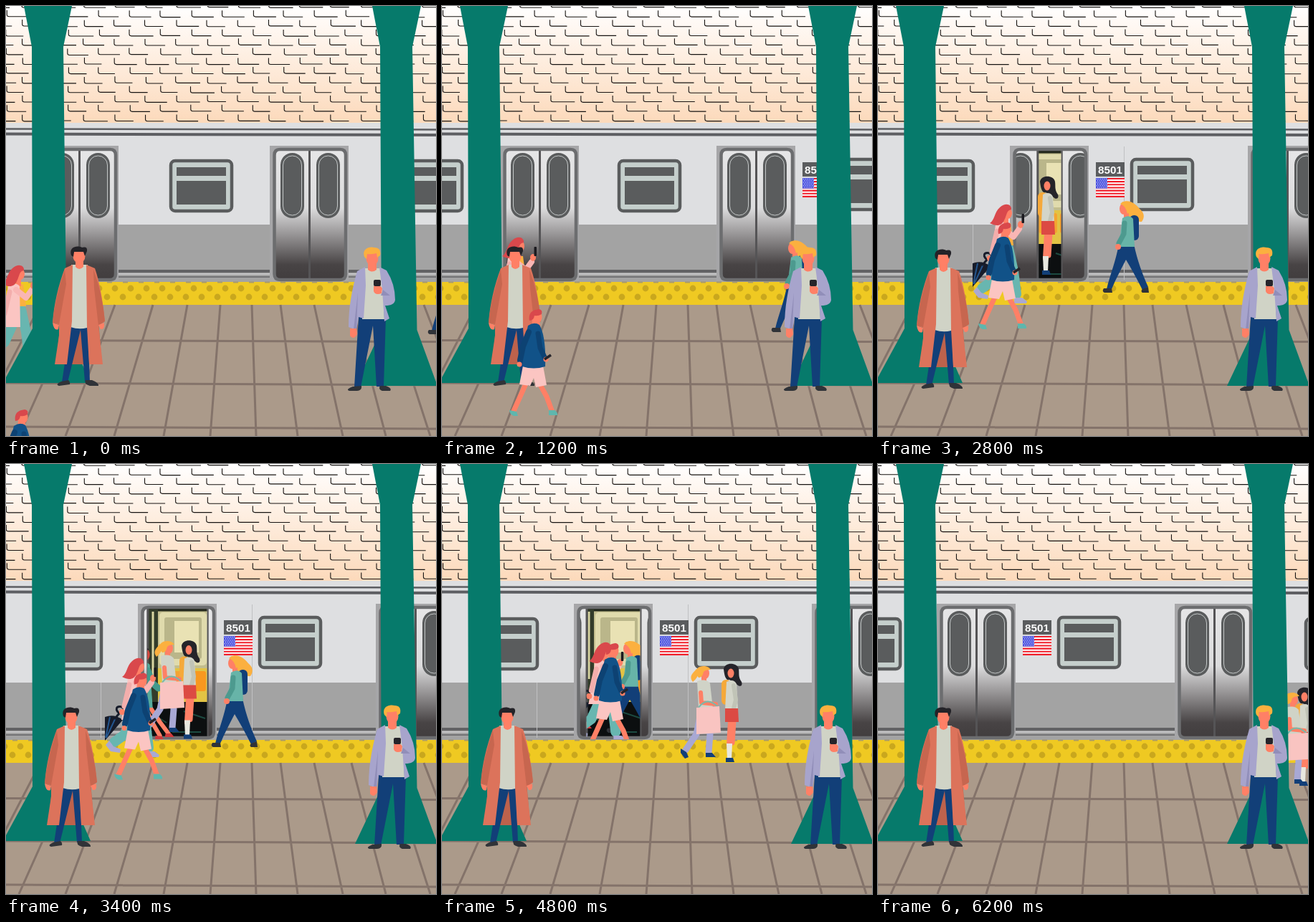
Recreate the animation shown at these times as an HTML page. Size 600x600 px, loop 6.4 s.

```html
<!DOCTYPE html>
<html lang="en">
<head>
<meta charset="utf-8">
<title>Subway platform</title>
<style>
html, body { margin: 0; width: 100%; height: 100%; overflow: hidden; background: #fff; }
svg { display: block; width: 100vw; height: 100vh; }
.skin { fill: #ff8066; }
.skinLine { stroke: #ff8066; }
.limb { fill: none; stroke-linecap: round; stroke-linejoin: round; }
.navy { fill: #123f78; }
.shoe { fill: #303338; }
.glass { fill: #5a5c5d; }
.pillar { fill: #067a6b; }
.num { font: bold 15.2px "Liberation Sans", Arial, sans-serif; fill: #fff; }
</style>
</head>
<body>
<svg viewBox="0 0 600 600">
<defs>
  <linearGradient id="wall" x2="0" y2="1"><stop stop-color="#fff"/><stop offset=".12" stop-color="#fffaf6"/><stop offset="1" stop-color="#fcd9ba"/></linearGradient>
  <linearGradient id="steel" x2="0" y2="1"><stop stop-color="#e6e6e7"/><stop offset=".45" stop-color="#dcdcdd"/><stop offset=".62" stop-color="#a2a0a1"/><stop offset=".88" stop-color="#484445"/><stop offset="1" stop-color="#403c3d"/></linearGradient>
  <clipPath id="opening"><rect x="2" y="199" width="100" height="184" rx="7"/></clipPath>
  <clipPath id="gap"><rect id="gapBox" x="239" y="200" width="0" height="184"/></clipPath>
  <pattern id="dots" x="9" y="388" width="22" height="24" patternUnits="userSpaceOnUse">
    <g fill="#c9a71d"><circle cx="11" cy="6" r="4.4"/><circle cx="0" cy="18" r="4.4"/><circle cx="22" cy="18" r="4.4"/></g>
  </pattern>

  <g id="leaf">
    <rect y="199" width="51" height="184" fill="url(#steel)"/>
    <rect x="10" y="205" width="33" height="91" rx="16.5" class="glass"/>
    <rect x="13.5" y="209" width="26" height="83" rx="13" fill="none" stroke="#c4c8c8"/>
  </g>
  <path id="frame" d="M2.5 374V208Q2.5 200 10.5 200H94Q102 200 102 208V374Q102 382 94 382H10.5Q2.5 382 2.5 374Z" fill="none" stroke="#6c6d6f" stroke-width="4.5"/>
  <g id="door">
    <rect x="-4" y="195" width="110" height="189" fill="#a6a6a8"/>
    <g clip-path="url(#opening)">
      <use href="#leaf" x="1"/><use href="#leaf" x="51"/>
      <rect x="50" y="200" width="3" height="182" fill="#555456"/>
    </g>
    <use href="#frame"/>
  </g>
  <g id="window">
    <rect x="2" y="2" width="85" height="70" rx="6" fill="#c5cfcc" stroke="#5a5c5d" stroke-width="4.5"/>
    <path class="glass" d="M10 11h69v12h-69zM10 30h69v33h-69z"/>
  </g>
</defs>

<rect width="600" height="165" fill="url(#wall)"/>
<path id="bricks" fill="none" stroke="#171412" stroke-width="1.1"/>

<rect y="163" width="600" height="223" fill="#dedfe1"/>
<path d="M0 171.5L600 172.5" stroke="#5d5e62" stroke-width="2.5"/>
<path d="M0 178.5L600 180" stroke="#5d5e62" stroke-width="4"/>
<rect y="305" width="600" height="81" fill="#a3a3a3"/>
<path d="M0 370H600" stroke="#626264" stroke-width="4"/>
<path d="M0 374H600" stroke="#c3c3c5" stroke-width="2"/>
<path d="M0 378H600" stroke="#727274" stroke-width="2"/>

<g id="train">
  <use href="#door" x="-623"/><use href="#window" x="-446" y="214"/>
  <use href="#door" x="-302"/><use href="#window" x="-142" y="214"/>
  <rect x="-4" y="195" width="110" height="189" fill="#a6a6a8"/>
  <g clip-path="url(#opening)">
    <rect y="198" width="104" height="188" fill="#c3be8e"/>
    <path d="M0 203H104" stroke="#23281c" stroke-width="5"/>
    <rect y="203" width="24" height="130" fill="#333c2a"/>
    <rect x="94" y="203" width="10" height="130" fill="#333c2a"/>
    <path d="M8 206V330M17 206V300M98 206V330" stroke="#d9d6a2" stroke-width="3"/>
    <rect x="26" y="207" width="66" height="74" rx="5" fill="#e0dbad"/>
    <rect x="33" y="214" width="52" height="58" rx="3" fill="#bab68a"/>
    <rect x="47" y="219" width="34" height="44" fill="#e9e2b4"/>
    <rect x="24" y="285" width="70" height="47" fill="#e2c344"/>
    <rect x="66" y="289" width="25" height="28" rx="3" fill="#f8981f"/>
    <rect x="36" y="289" width="26" height="28" rx="3" fill="#f3a531"/>
    <rect y="332" width="104" height="54" fill="#0c0f10"/>
    <path d="M10 345l26 16M44 374h40M60 345l30 10" stroke="#1c4a40" stroke-width="2"/>
    <g id="leafL"><use href="#leaf" x="1"/><rect x="50" y="200" width="3" height="182" fill="#555456"/></g>
    <g id="leafR"><use href="#leaf" x="51"/><rect x="51" y="200" width="2" height="182" fill="#555456"/></g>
  </g>
  <use href="#frame"/>
  <path id="seams" d="M-55.5 305V382M155.5 196V382" stroke="#c0c0c2" stroke-width="1"/>
  <rect x="116" y="218" width="40" height="20" fill="#5a5c5e"/>
  <text class="num" x="136" y="233.5" text-anchor="middle">8501</text>
  <rect x="116" y="240" width="40" height="27" fill="#fff"/>
  <path id="stripes" stroke="#f0202c" stroke-width="2.08"/>
  <rect x="116" y="240" width="16" height="14.6" fill="#4a52e0"/>
  <path id="stars" stroke="#fff" stroke-width="1" stroke-dasharray="1 1.6"/>
  <use href="#window" x="164" y="212"/><use href="#door" x="332"/><use href="#window" x="509" y="214"/>
</g>

<rect y="385" width="600" height="33" fill="#efc922"/>
<rect y="388" width="600" height="24" fill="url(#dots)"/>
<path d="M9 385.5H600" stroke="#a89a6c" stroke-width="2" stroke-dasharray="7 15"/>
<rect y="417" width="600" height="183" fill="#ab9a8a"/>
<path id="tiles" stroke="#84736a" stroke-width="3"/>

<g id="rider">
  <path d="M-11 -3C-9 -13 8 -12 10 -3C11 4 9 8 14 15C16 20 12 23 8 19L-3 12C-8 14 -10 6 -11 -3Z" fill="#25242a"/>
  <ellipse class="skin" cx="-1" cy="3" rx="4.5" ry="6.5"/>
  <path class="limb skinLine" d="M-1 70L-3 104" stroke-width="8"/>
  <path class="limb skinLine" d="M3 70L1 100" stroke-width="7"/>
  <path d="M-7 101H1L0 123H-6Z" fill="#e8e8e0"/>
  <path class="navy" d="M-8 121H2L4 127H-8Z"/>
  <rect x="-14" y="12" width="13" height="35" rx="6" fill="#f5a93a"/>
  <path d="M-7 15Q3 10 7 18L9 54H-9Z" fill="#d3d5c9"/>
  <path class="limb" d="M3 20L6 40L3 52" stroke="#c1c4b7" stroke-width="6"/>
  <path d="M-9 52H9L10 71H-9Z" fill="#dc4a43"/>
</g>

<g id="teal">
  <path class="limb skinLine" d="M2 70L13 94L24 113M8 70L24 94L36 110" stroke-width="6"/>
  <path d="M18 113l9 1l3 6h-13zM32 110l8 0l4 5h-13z" fill="#cf3a3c"/>
  <ellipse cx="4" cy="0" rx="6" ry="8" fill="#d9483f"/>
  <path d="M-9 3C-9 -12 5 -13 9 -7Q2 -5 -1 4Z" fill="#25242a"/>
  <path d="M-8 14Q2 7 10 14L14 74H-10Z" fill="#55aa9c"/>
  <path class="limb" d="M7 22L14 40L22 47" stroke="#439a8c" stroke-width="9"/>
</g>

<g id="shopper">
  <path d="M-7 -5C-12 1 -18 5 -12 13C-7 9 -5 5 -4 1Z" fill="#fbb03f"/>
  <ellipse class="skin" cx="5" cy="1" rx="6" ry="8"/>
  <path class="skin" d="M0 4h7v10h-7z"/>
  <path d="M-8 2C-10 -11 9 -12 13 -4Q5 -4 3 -1Q1 8 -4 7Z" fill="#fbb03f"/>
  <path class="limb" d="M0 52L-7 86L-22 108" stroke="#a8a8d4" stroke-width="9"/>
  <path class="limb" d="M7 52L12 86L10 112" stroke="#a8a8d4" stroke-width="9"/>
  <path class="navy" d="M-29 106l8 5l3 7l-5 2l-6 -8zM6 112h9l5 6h-14z"/>
  <path d="M-6 12Q6 8 12 15L16 50H-4Z" fill="#d0d3c7"/>
  <path class="limb skinLine" d="M-1 28L0 42L20 44" stroke-width="6"/>
  <path d="M-4 49Q8 32 24 49" fill="none" stroke="#77b9aa" stroke-width="2"/>
  <path d="M-7 49L25 47L27 84L-7 86Z" fill="#f9c4c1"/>
</g>

<g id="student">
  <path d="M-4 -8C8 -14 18 -3 21 1C27 6 29 12 24 19C14 20 7 12 2 10Z" fill="#fbb03f"/>
  <ellipse class="skin" cx="-1" cy="1" rx="6" ry="8"/>
  <path class="skin" d="M-1 5h7v10h-7z"/>
  <path d="M-6 -6C0 -12 9 -9 10 4L4 8Q2 -3 -6 -6Z" fill="#fbb03f"/>
  <rect x="7" y="10" width="13" height="35" rx="6" class="navy"/>
  <path class="navy" d="M-8 50H13C18 74 25 92 33 110L25 114C16 96 8 82 2 72C-4 84 -12 98 -18 113H-25C-20 92 -12 74 -8 50Z"/>
  <path class="shoe" d="M-29 112l11 0l1 6h-11q-4-2-1-6zM25 113l8-3l1 8h-9q-3-2 0-5z"/>
  <path d="M-3 14Q6 8 12 15L14 54H-8Z" fill="#67b4a8"/>
  <path class="limb" d="M0 21L-1 36L-8 49" stroke="#4d9a8f" stroke-width="7"/>
  <circle class="skin" cx="-9" cy="54" r="4"/>
</g>

<g id="lady">
  <path class="limb" d="M-2 70L-13 94L-27 104" stroke="#68b6b0" stroke-width="14"/>
  <path class="limb" d="M10 48L17 80L21 112" stroke="#68b6b0" stroke-width="14"/>
  <path d="M-34 102l6 8l10 4l-1 5l-13-2l-7-9zM18 117l11 0l7 5l-1 3h-17z" fill="#a9a9d3"/>
  <path d="M-40 69Q-27 64 -15 73L-40 102Z" fill="#171c2a"/>
  <path d="M-33 69L-39 98M-25 70L-38 98" stroke="#24558d" stroke-width="2"/>
  <path class="limb" d="M-26 71L-20 64C-29 56 -20 52 -15 56Q-11 60 -14 66" stroke="#171c2a" stroke-width="3"/>
  <path d="M5 13H13L17 44H4Z" fill="#fbb040"/>
  <ellipse class="skin" cx="9" cy="-1" rx="6" ry="8"/>
  <path class="skin" d="M3 5h7v11h-7z"/>
  <path d="M-8 15Q2 9 8 16L9 73H-17Q-11 44 -8 15Z" fill="#fbc5c2"/>
  <path class="limb" d="M3 21L17 32L25 21" stroke="#f9b6b4" stroke-width="8"/>
  <path class="limb" d="M-6 24L-13 54" stroke="#f3aeac" stroke-width="7"/>
  <circle class="skin" cx="-16" cy="62" r="4"/>
  <ellipse class="skin" cx="27" cy="15" rx="4" ry="5"/>
  <rect x="28.5" y="0" width="3.5" height="13" rx="1" fill="#1c1b20"/>
  <path d="M-2 -9C7 -17 15 -12 14 -6C7 -5 8 2 4 9C1 17 -7 18 -16 13C-9 9 -10 -2 -2 -9Z" fill="#d9484c"/>
</g>

<path class="pillar" d="M25 0H92L80 57L84.500 450L118 526H0V518L37 450L36 57Z"/>
<path class="pillar" d="M511 0H579L567 57L573.500 452L602 530H487L524 452L522 57Z"/>

<g id="coatMan">
  <path d="M-19 20L-32 152H32L21 20Z" fill="#bd624c"/>
  <path class="navy" d="M-12 98H12L15 176H8L2 104L-16 177H-24Z"/>
  <path class="shoe" d="M-25 176l10-2q3 3 2 6l-15 2q-6-2 3-6zM9 174l9 0q10 4 9 8l-12 0q-9-3-6-8z"/>
  <path d="M-11 13H12L11 101Q0 104 -12 100Z" fill="#d0d3c6"/>
  <path class="skin" d="M-5 5H6V16Q0 22 -5 16Z"/>
  <path d="M-9 13L-20 18C-29 42 -35 67 -37 94L-28 97L-28 112L-34 152H-17L-10 92Z" fill="#dc735b"/>
  <path d="M10 13L22 18C29 38 33 64 36 92L27 98L33 152H14L11 100Z" fill="#dc735b"/>
  <path d="M-18 40L-28 96L-37 94Q-34 60 -20 20ZM20 20Q33 54 36 92L27 98L21 46Z" fill="#c7664f"/>
  <path class="skin" d="M-37 94l9 3l-1 6q-6 3-8-9zM27 97l8-3q1 10-5 9z"/>
  <ellipse class="skin" cx="0" cy="1" rx="8.5" ry="10"/>
  <path d="M-11 0C-15 -13 -1 -14 4 -11Q12 -13 11 -6L8 1L6 -5H-7L-8 2Z" fill="#242328"/>
</g>

<g id="phoneMan">
  <path class="navy" d="M-19 84H19L16 181H6L1 96L-16 182H-25Z"/>
  <path class="shoe" d="M-27 181l12-1q1 6-6 7h-11q-6-2 5-6zM11 180l8 0q9 3 6 7h-11q-6-2-3-7z"/>
  <path d="M-12 16H14L17 87H-14Z" fill="#d0d3c6"/>
  <path class="skin" d="M-6 5H6V18Q0 23 -6 18Z"/>
  <path d="M-10 14L-21 20C-28 44 -33 70 -33 98L-22 102L-19 84L-12 86L-9 40Z" fill="#a7a4cc"/>
  <path d="M10 14L20 19Q32 38 32 60Q31 68 18 68L24 86L17 90L14 46Z" fill="#a7a4cc"/>
  <path d="M-20 50L-22 101L-26 101ZM15 46L25 54L12 54Z" fill="#918eb9"/>
  <path class="skin" d="M-31 100h9l1 8q-5 9-10 2zM2 41q9-3 12 3l-1 7q-9 3-11-3z"/>
  <rect x="2" y="32" width="10" height="9" rx="2" fill="#25242a"/>
  <ellipse class="skin" cx="0" cy="2" rx="8.5" ry="10.5"/>
  <path d="M-11 0C-15 -12 -3 -15 3 -13Q13 -13 11 -2L7 1L6 -5Q-3 -3 -7 -4L-8 3Z" fill="#fbb03f"/>
</g>

<g id="boy">
  <path class="limb skinLine" d="M-13 92L-22 112L-31 132M4 92L15 112L22 131" stroke-width="7"/>
  <path d="M-37 131l10 2l2 6h-6q-6-3-6-8zM18 131l8 0q5 3 4 7h-12z" fill="#5fb6ad"/>
  <path d="M-18 69H10L15 96L0 99L-3 86L-8 97L-23 95Z" fill="#fbc5c2"/>
  <path class="skin" d="M-5 5H5V15H-6Z"/>
  <path d="M-11 13Q-2 7 5 12C12 24 14 48 13 70Q-3 75 -19 70Q-17 35 -11 13Z" fill="#115288"/>
  <path class="limb" d="M-10 22L-18 42L-22 61" stroke="#0d4273" stroke-width="8"/>
  <path class="limb" d="M3 24L6 44L12 57" stroke="#0d4273" stroke-width="7"/>
  <circle class="skin" cx="-23" cy="67" r="3.5"/>
  <circle class="skin" cx="14" cy="60" r="3.5"/>
  <path d="M12 60L21 54" stroke="#25242a" stroke-width="3.5"/>
  <ellipse class="skin" cx="1" cy="1" rx="7.5" ry="9"/>
  <path d="M-9 6C-11 -8 -1 -9 4 -10Q10 -9 8 -3Q3 0 -2 -1Q-3 6 -9 6Z" fill="#d9484c"/>
</g>
</svg>

<script>
const $ = id => document.getElementById(id);
const STEP = 200, STEPS = 32;

// Static line work
let seed = 7;
const rand = () => (seed = seed * 16807 % 2147483647) / 2147483647;
let d = '';
for (let row = 0; row < 13; row++) {
  for (let x = row % 2 ? -43.5 : -21.5; x < 600; x += 43) {
    const left = x + rand() * 2, y = 1.5 + row * 13.2 + rand();
    const len = 20 + rand() * 12;
    d += `M${left} ${y - 9}v6.5q0 2.5 3 2.5h${len}`;
  }
}
$('bricks').setAttribute('d', d);

d = 'M0 466.5L600 468.5M0 526L600 529M0 587L600 590';
const tops = [48, 100, 152, 205, 253, 299, 343, 383, 430, 482, 533, 583];
const ends = [-47, 18, 83, 151, 220, 285, 349, 407, 470, 530, 592, 654];
tops.forEach((x, i) => d += `M${x} 417L${ends[i]} 600`);
d += 'M-2 417L-112 600';
$('tiles').setAttribute('d', d);

d = '';
for (let i = 0; i < 7; i++) d += `M116 ${241 + i * 4.15}h40`;
$('stripes').setAttribute('d', d);
d = '';
for (let i = 0; i < 6; i++) d += `M${117 + i % 2} ${241.5 + i * 2.3}h14`;
$('stars').setAttribute('d', d);

// Each key: step, x, y
const tracks = {
  train: [[0, 674, 0], [6, 387, 0], [10, 188, 0], [29, 188, 0], [31, 86, 0]],
  lady: [[0, 11, 375], [6, 100, 336], [10, 155, 303], [14, 172, 290], [20, 184, 278], [23, 218, 264], [26, 228, 258]],
  boy: [[0, 22, 573], [6, 131, 433], [10, 171, 348], [14, 177, 312], [20, 199, 291], [24, 238, 260], [26, 242, 256]],
  student: [[0, 619, 340], [6, 490, 337], [10, 408, 306], [14, 344, 282], [20, 290, 272], [23, 262, 258], [26, 256, 254]],
  rider: [[14, 237, 248], [16, 244, 252], [20, 292, 270], [28, 516, 308], [31, 596, 322]],
  shopper: [[14, 188, 248], [17, 222, 256], [20, 234, 268], [28, 490, 314], [31, 575, 328]],
  teal: [[15, 172, 258], [18, 200, 270], [20, 209, 277], [22, 200, 262], [24, 165, 254]],
  coatMan: [[0, 102, 348], [6, 102, 348], [10, 91, 352]],
  phoneMan: [[0, 511, 350], [6, 511, 350], [10, 539, 350]]
};
// Steps spent inside the car, seen only through the doorway
const inside = {
  lady: k => k >= 23, boy: k => k >= 24, student: k => k >= 23,
  rider: k => k < 16, shopper: k => k < 17, teal: k => k < 18 || k > 21
};
for (const id in inside) {
  const wrap = document.createElementNS('http://www.w3.org/2000/svg', 'g');
  $(id).before(wrap);
  wrap.append($(id));
}

function at(keys, k) {
  const n = keys.findIndex(key => key[0] > k);
  if (n === 0) return keys[0].slice(1);
  if (n < 0) return keys[keys.length - 1].slice(1);
  const a = keys[n - 1], b = keys[n], p = (k - a[0]) / (b[0] - a[0]);
  return [a[1] + (b[1] - a[1]) * p, a[2] + (b[2] - a[2]) * p];
}

const clamp = v => Math.max(0, Math.min(1, v));
const move = (id, x, y) => $(id).setAttribute('transform', `translate(${x} ${y})`);

function draw(k) {
  for (const id in tracks) move(id, ...at(tracks[id], k));
  const gap = 50 * Math.min(clamp((k - 12) / 6), clamp((27 - k) / 4));
  move('leafL', -gap, 0);
  move('leafR', gap, 0);
  $('seams').style.display = gap ? '' : 'none';
  $('gapBox').setAttribute('x', 239 - gap);
  $('gapBox').setAttribute('width', gap * 2);
  for (const id in inside) {
    const wrap = $(id).parentNode;
    if (inside[id](k)) wrap.setAttribute('clip-path', 'url(#gap)');
    else wrap.removeAttribute('clip-path');
  }
}

const start = performance.now();
let last = -1;
function tick() {
  const k = Math.floor((performance.now() - start) / STEP) % STEPS;
  if (k !== last) draw(last = k);
  requestAnimationFrame(tick);
}
tick();
</script>
</body>
</html>
```
